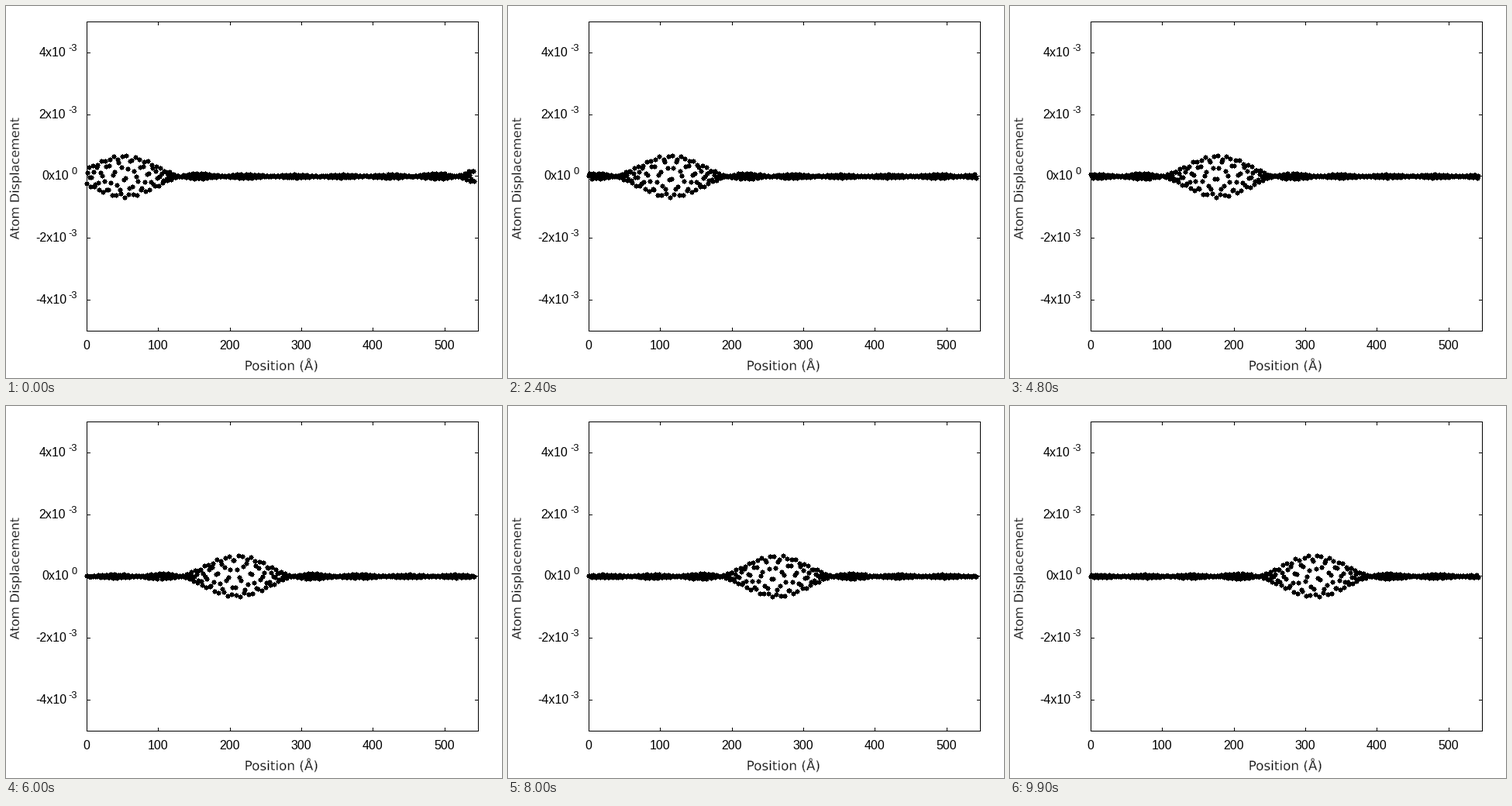
These frames come from a looping animation (640 px wide and 480 px high, 10 s). A matplotlib script:

```python
import numpy as np
import matplotlib.pyplot as plt
from matplotlib.animation import FuncAnimation
from matplotlib.collections import PolyCollection
from matplotlib.patheffects import Normal, Stroke

W, H, DPI = 640, 480, 100
PX = 72 / DPI                               # points per pixel
LEFT, RIGHT, TOP, BOTTOM = 104, 609, 20, 419
X_SCALE = (RIGHT - LEFT) / 547              # pixels per angstrom
Y_SCALE = (BOTTOM - TOP) / 10               # pixels per 1e-3
MID = (TOP + BOTTOM) / 2

FRAMES = 100
ATOMS, SPACING = 400, 1.3575                # silicon planes, a/4 apart
MODES = np.arange(88, 96)                   # wave numbers in the packet
CARRIER = MODES.mean()
WEIGHTS = np.exp(-0.5 * ((MODES - CARRIER) / 3.4) ** 2)
AMPLITUDE = 0.68
CENTRE, SPEED = 38.3, 1.937                 # in atoms, atoms per frame
PHASE, FREQUENCY = 0.416, 0.554             # in cycles, cycles per frame

fig = plt.figure(figsize=(W / DPI, H / DPI), dpi=DPI, facecolor="white")
ax = fig.add_axes([0, 0, 1, 1])
ax.set_xlim(0, W)
ax.set_ylim(H, 0)
ax.axis("off")


def line(x0, y0, x1, y1):
    ax.plot([x0 + 0.5, x1 + 0.5], [y0 + 0.5, y1 + 0.5], color="black",
            lw=PX, solid_capstyle="projecting", snap=False, zorder=3)


def label(x, y, text, size=16, family="Liberation Sans", **kw):
    return ax.text(x, y, text, fontsize=size * PX, family=family,
                   color="black", va="baseline", **kw)


def thin_label(x, y, text, size, **kw):
    art = label(x, y, text, size, "DejaVu Sans", ha="center",
                rotation_mode="anchor", **kw)
    art.set_path_effects([Normal(), Stroke(linewidth=0.45 * PX,
                                           foreground="white")])


def draw_axes():
    for y in (TOP, BOTTOM):
        line(LEFT, y, RIGHT, y)
    for x in (LEFT, RIGHT):
        line(x, TOP, x, BOTTOM)
    for value in range(0, 600, 100):
        x = round(LEFT + value * X_SCALE)
        line(x, BOTTOM, x, BOTTOM - 4)
        line(x, TOP, x, TOP + 4)
        label(x, 443, str(value), ha="center")
    for value in (-4, -2, 0, 2, 4):
        y = round(MID - value * Y_SCALE - 0.1)
        line(LEFT, y, LEFT + 4, y)
        line(RIGHT, y, RIGHT - 4, y)
        base_end = 81 if value == 0 else 77 if value > 0 else 78.5
        label(base_end, y + 5, f"{value}x10", ha="right")
        label(91.5, y - 2, "-3" if value else "0", 12.8, ha="right")
    thin_label(355.2, 470, "Position (Å)", 16.8)
    thin_label(16.8, 222.5, "Atom Displacement", 16, rotation=90)


def dot_outline():
    corner = np.array([(0.5, 3.5), (0.5, 2.5), (2.5, 2.5),
                       (2.5, 0.5), (3.5, 0.5)])
    parts = []
    for _ in range(4):
        parts.append(corner)
        corner = np.column_stack([corner[:, 1], -corner[:, 0]])
    return np.concatenate(parts)


def displacement(t):
    """Weighted neighbouring modes: a packet gliding along a periodic chain."""
    centre = CENTRE + SPEED * t
    n = MODES[:, None]
    cycles = (n * atom - (n - CARRIER) * centre) / ATOMS
    cycles = cycles - PHASE - FREQUENCY * t
    return AMPLITUDE * np.average(np.cos(2 * np.pi * cycles), axis=0,
                                  weights=WEIGHTS)


atom = np.arange(ATOMS)
atom_x = np.round(LEFT + atom * SPACING * X_SCALE)
outline = dot_outline()
dots = PolyCollection([], facecolor="black", edgecolor="none", linewidth=0,
                      snap=False, zorder=4)
ax.add_collection(dots, autolim=False)
draw_axes()


def update(t):
    y = np.round(MID - displacement(t) * Y_SCALE)
    centres = np.column_stack([atom_x, y]) + 0.5
    dots.set_verts(centres[:, None, :] + outline)
    return (dots,)


anim = FuncAnimation(fig, update, frames=FRAMES, interval=100,
                     repeat=True, repeat_delay=0, blit=False)
plt.show()
```
